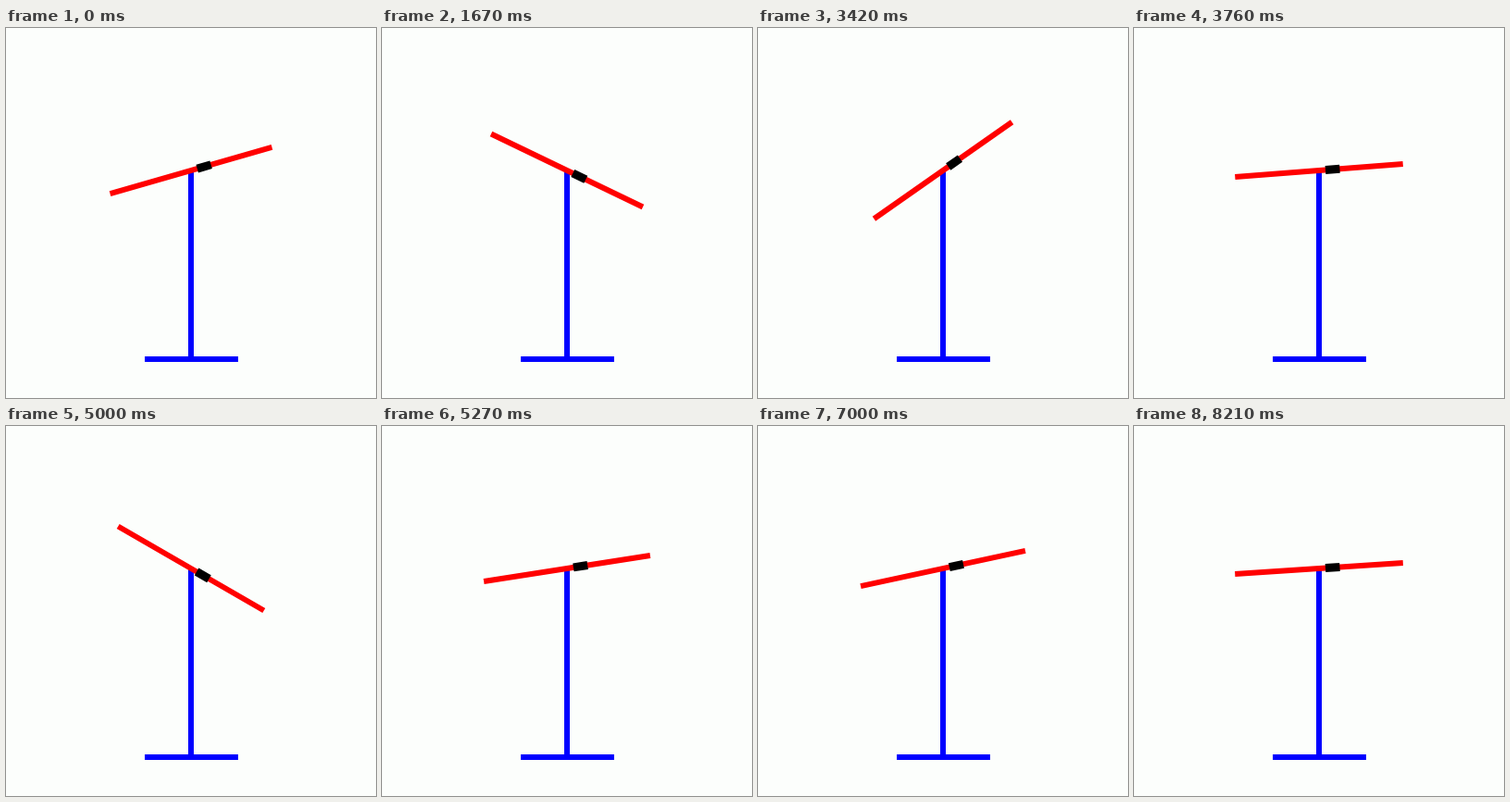
An HTML page that plays this animation: 400x400 px, repeating every 8.33 s.

```html
<!DOCTYPE html>
<html lang="en">
<head>
<meta charset="utf-8">
<title>Balancing beam</title>
<style>
  html, body { margin: 0; width: 100%; height: 100%; overflow: hidden; background: #fcfefc; }
  svg { display: block; width: 100%; height: 100%; }
</style>
</head>
<body>
<svg viewBox="0 0 400 400">
  <path d="M200 154V358M150 358H251" stroke="#00f" stroke-width="6"/>
  <g id="beam">
    <path d="M-91 0H91" stroke="#f00" stroke-width="6"/>
    <path d="M7 0H22.5" stroke="#000" stroke-width="9"/>
  </g>
</svg>
<script>
const LOOP = 8330, STEPS = 250, STEPS_PER_KICK = 50;
const STEP = LOOP / STEPS;
const DAMPING = 0.57; // decay rate relative to the swing rate

// Each kick throws the beam to an angle; it then swings back at its own rate.
const kicks = [
  { angle: 16, rate: 12 },
  { angle: -25.7, rate: 11 },
  { angle: 51, rate: 13.1 },
  { angle: -30, rate: 9.8 },
  { angle: -46, rate: 9.4 },
];
const beam = document.getElementById('beam');

function restAngle(ms) {
  const p = Math.min(1, Math.max(0, (ms - 6060) / 240));
  return 4.4 - 0.6 * p;
}

function beamAngle(step) {
  const { angle, rate } = kicks[Math.floor(step / STEPS_PER_KICK)];
  const phase = rate * (step % STEPS_PER_KICK) * STEP / 1000;
  const swing = Math.exp(-DAMPING * phase) * (Math.cos(phase) + DAMPING * Math.sin(phase));
  const rest = restAngle(step * STEP);
  return rest + (angle - rest) * swing;
}

function draw() {
  const step = Math.floor(performance.now() % LOOP / STEP + 0.1) % STEPS;
  beam.setAttribute('transform', `translate(200 154) rotate(${-beamAngle(step)})`);
  requestAnimationFrame(draw);
}
draw();
</script>
</body>
</html>
```
